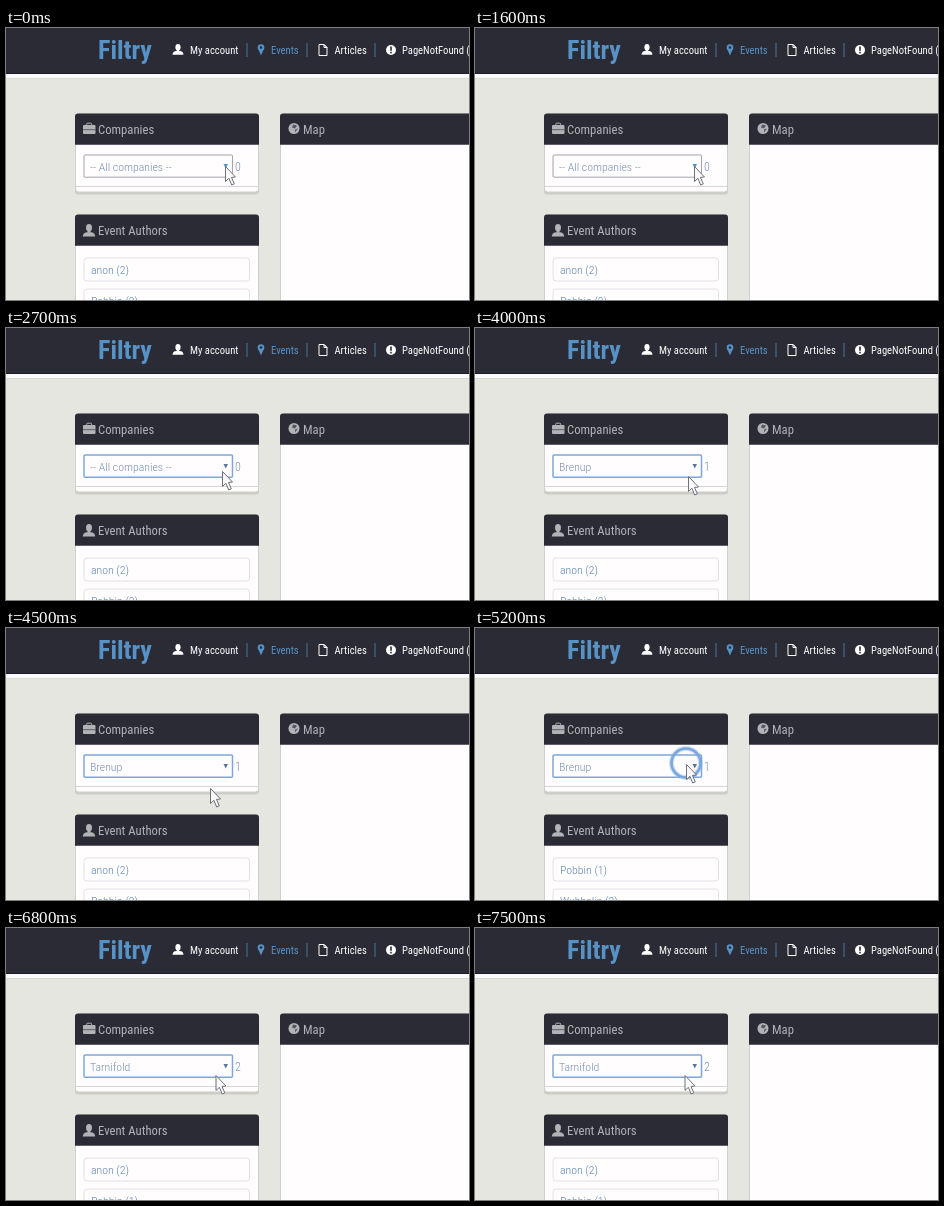
Write an HTML page with a canvas that moves like this. It is 463 px wide and 272 px high and loops after 8000 ms.

```html
<!DOCTYPE html>
<html lang="en">
<head>
<meta charset="utf-8">
<title>Events filter</title>
<style>
  html, body { margin: 0; width: 100%; height: 100%; overflow: hidden; background: #e5e6df; }
  canvas { display: block; width: 463px; height: 272px; }
</style>
</head>
<body>
<canvas id="stage" width="463" height="272"></canvas>
<script>
const ctx = document.getElementById('stage').getContext('2d');
const LOOP = 8000, STEP = 100;
const FIRST_CLICK = 2200, CLICK_GAP = 3000, LIST_DELAY = 600;
const FAMILY = '"Roboto Condensed", "Liberation Sans Narrow", Roboto, sans-serif';
const DARK = '#2b2b36', BLUE = '#5792c6', GREY = '#b2b3b7', INK = '#7590b3', PAPER = '#fffdfe';

const CHOICES = [
  { at: 0, label: '-- All companies --', authors: ['anon (2)', 'Pobbin (2)'] },
  { at: 4000, label: 'Brenup', authors: ['Pobbin (1)', 'Wubbalin (2)'] },
  { at: 6200, label: 'Tarnifold', authors: ['anon (2)', 'Pobbin (1)'] }
];

const choiceAt = t => Math.max(0, CHOICES.findLastIndex(choice => choice.at <= t));

function ease(t, start, end) {
  const k = Math.min(1, Math.max(0, (t - start) / (end - start)));
  return k * k * (3 - 2 * k);
}

function pointerAt(t) {
  let x = 219, y = 138;
  const glide = (toX, toY, start, end) => {
    const k = ease(t, start, end);
    x += (toX - x) * k;
    y += (toY - y) * k;
  };
  glide(213, 148, 2500, 2900);
  glide(204, 160, 4000, 4500);
  glide(211, 136, 4600, 5100);
  glide(205, 168, 5500, 6300);
  glide(209.5, 147, 6400, 6800);
  return [x, y];
}

function text(str, x, y, size, color, weight = 400) {
  ctx.font = `${weight} ${size}px ${FAMILY}`;
  ctx.fontStretch = 'condensed';
  ctx.fillStyle = color;
  ctx.fillText(str, x, y);
}

function rect(x, y, w, h, color) {
  ctx.fillStyle = color;
  ctx.fillRect(x, y, w, h);
}

function paint(fill, stroke, width = 1) {
  if (fill) { ctx.fillStyle = fill; ctx.fill(); }
  if (stroke) { ctx.strokeStyle = stroke; ctx.lineWidth = width; ctx.stroke(); }
}

function box(x, y, w, h, radius, fill, stroke, width) {
  ctx.beginPath();
  ctx.roundRect(x, y, w, h, radius);
  paint(fill, stroke, width);
}

function disc(x, y, r, fill, stroke, width) {
  ctx.beginPath();
  ctx.arc(x, y, r, 0, Math.PI * 2);
  paint(fill, stroke, width);
}

function poly(points, fill, stroke) {
  ctx.beginPath();
  points.forEach(([x, y]) => ctx.lineTo(x, y));
  ctx.closePath();
  paint(fill, stroke);
}

function person(x, y, s, color) {
  ctx.beginPath();
  ctx.ellipse(x, y - 2.5 * s, 2.7 * s, 3.4 * s, 0, 0, Math.PI * 2);
  paint(color);
  rect(x - 1.3 * s, y - s, 2.6 * s, 3 * s, color);
  box(x - 5.7 * s, y + 1.5 * s, 11.4 * s, 4 * s, [4 * s, 4 * s, 0, 0], color);
}

function briefcase(x, y) {
  box(x + 3.7, y + .7, 5, 4, 1, null, GREY);
  box(x, y + 2.5, 12.5, 9, 1, GREY);
  rect(x, y + 7, 12.5, .6, DARK);
}

function globe(x, y) {
  disc(x, y, 5.5, GREY);
  poly([[x - 1, y - 4], [x + 3, y - 3], [x + 1, y], [x - 2, y - 1]], '#55565f');
  poly([[x + 1, y + 1], [x + 4, y], [x + 1, y + 4]], '#55565f');
}

function pin(x, y) {
  poly([[x - 3, y + 1], [x, y + 8], [x + 3, y + 1]], BLUE);
  disc(x, y, 3.3, BLUE);
  disc(x, y, 1.3, DARK);
}

function page(x, y) {
  poly([[x, y], [x + 5, y], [x + 8, y + 3], [x + 8, y + 11], [x, y + 11]], null, '#fff');
  poly([[x + 5, y], [x + 5, y + 3], [x + 8, y + 3]], null, '#fff');
}

function alertMark(x, y) {
  disc(x, y, 5, '#fff');
  rect(x - .8, y - 3.5, 1.6, 4.3, DARK);
  rect(x - .8, y + 1.8, 1.6, 1.6, DARK);
}

function header() {
  rect(0, 0, 463, 45, DARK);
  rect(0, 45, 463, 1, '#1f1a2b');
  rect(0, 46, 463, 4, '#fbfafc');
  rect(0, 50, 463, 1, '#d9d9d5');
  text('Filtry', 92, 31, 26, BLUE, 700);
  const link = (label, x, color = '#fff') => text(label, x, 26, 10.6, color);
  const divider = x => rect(x, 15, 1, 14, '#47789f');
  person(172, 21.5, .95, '#fff');
  link('My account', 184);
  divider(240.5);
  pin(255, 19.5);
  link('Events', 265, BLUE);
  divider(300.5);
  page(313, 16.5);
  link('Articles', 328.5);
  divider(368.5);
  alertMark(385, 22);
  link('PageNotFound (404)', 396);
}

function panel(x, y, w, h, title) {
  box(x, y + 2, w, h, 3, 'rgba(90,90,80,.18)');
  box(x + .5, y + .5, w - 1, h - 1, 3, PAPER, '#cfcfcb');
  box(x, y, w, 31.3, [3, 3, 0, 0], DARK);
  text(title, x + 23, y + 20, 12.7, GREY);
}

function select(t) {
  const focused = t >= FIRST_CLICK;
  const index = choiceAt(t);
  box(78, 127, 148.5, 22.2, 1, PAPER, focused ? '#7fa6d8' : '#a3a4ab', focused ? 1.5 : 1);
  text(CHOICES[index].label, 84, 142.5, 11.8, INK, 300);
  poly([[217.5, 136], [222, 136], [219.75, 140.5]], focused ? '#587799' : BLUE);
  text(index, 229, 142.5, 12, INK, 300);
}

function authors(t) {
  CHOICES[choiceAt(t - LIST_DELAY)].authors.forEach((name, i) => {
    const y = 230 + i * 31;
    box(78, y, 165.5, 23, 3, PAPER, '#e0e0e6');
    text(name, 85, y + 15.5, 11.8, '#5a84b0', 300);
  });
}

function ring(x, y) {
  disc(x, y, 14.5, null, 'rgba(130,172,225,.35)', 5);
  disc(x, y, 14.5, null, '#7aa8de', 2.6);
}

function pointer(x, y) {
  ctx.save();
  ctx.translate(x + .5, y + .5);
  ctx.lineJoin = 'round';
  poly([[0, 0], [0, 15], [3.4, 11.8], [6.2, 18.5], [8.8, 17.4], [6, 10.9], [10, 10.5]], '#fafafa', '#6f7078');
  ctx.restore();
}

function draw(t) {
  rect(0, 0, 463, 272, '#e5e6df');
  header();
  panel(69, 85.5, 184, 79, 'Companies');
  briefcase(77, 94.5);
  rect(70, 158, 182, 1, '#d6d5db');
  panel(69, 186.5, 184, 120, 'Event Authors');
  person(83, 202.5, 1.1, GREY);
  panel(274, 85.5, 220, 220, 'Map');
  globe(288, 100.5);
  select(t);
  authors(t);
  const [x, y] = pointerAt(t);
  const sinceClick = (t - FIRST_CLICK) % CLICK_GAP;
  if (sinceClick >= 0 && sinceClick < STEP) ring(x, y - 1);
  pointer(x, y);
}

function frame() {
  const t = performance.now() % LOOP;
  draw(Math.floor(t / STEP) * STEP);
  requestAnimationFrame(frame);
}
frame();
</script>
</body>
</html>
```
